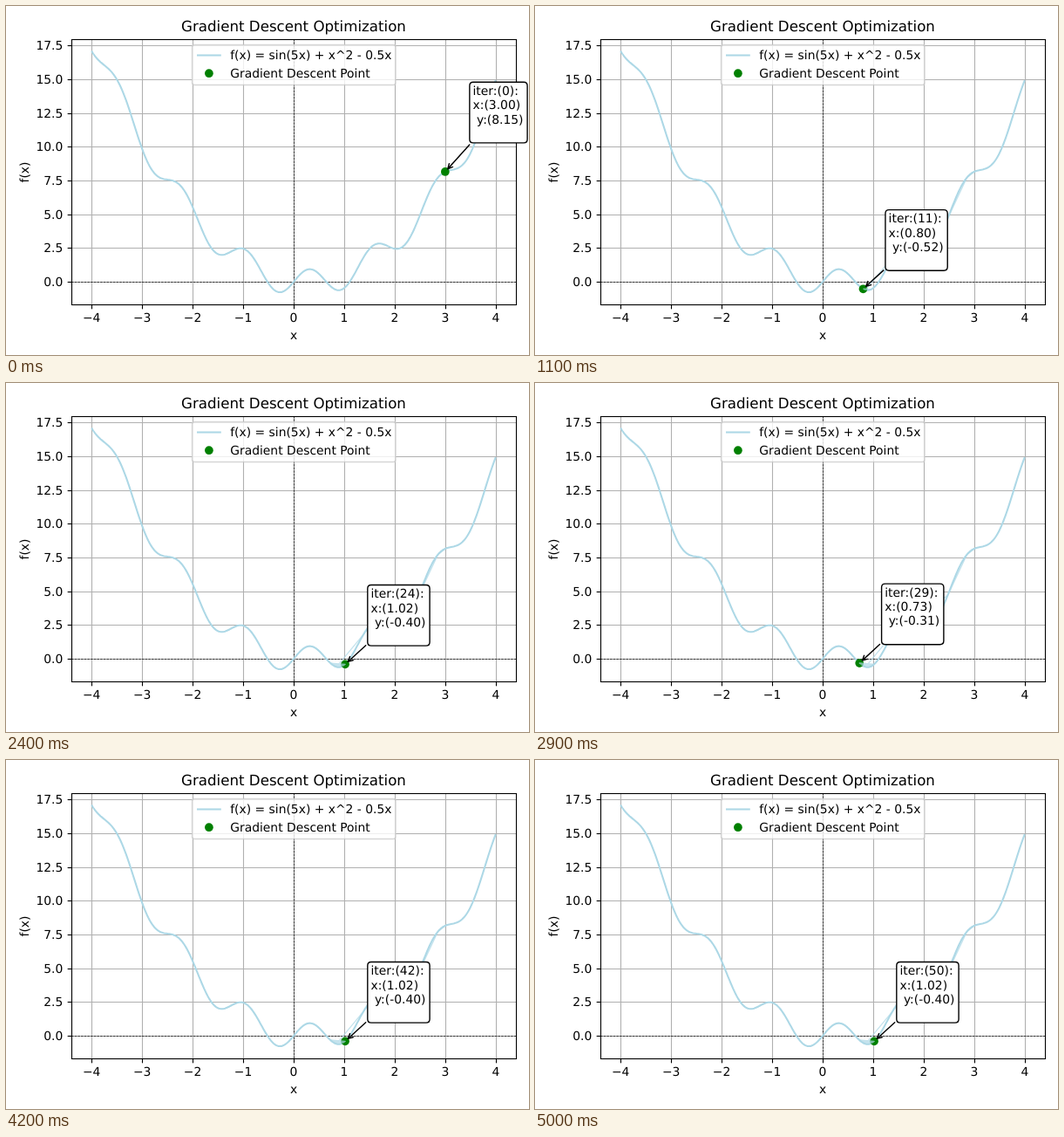
An HTML page for the animation above (5100 ms loop, 600 by 400 pixels).

```html
<!DOCTYPE html>
<html lang="en">
<head>
<meta charset="utf-8">
<title>Gradient Descent Optimization</title>
<style>
  html, body { margin: 0; width: 100%; height: 100%; overflow: hidden; background: #fff; }
  svg { display: block; width: 600px; height: 400px; }
  text { font: 13.89px "DejaVu Sans", sans-serif; white-space: pre; text-rendering: geometricPrecision; }
  .mid { text-anchor: middle; }
  .end { text-anchor: end; }
  .title { font-size: 16.67px; }
  .grid { stroke: #b0b0b0; stroke-width: 1.11; }
  .tick { stroke: #000; stroke-width: 1.11; }
  .zero { stroke: #000; stroke-width: .7; stroke-dasharray: 2.57 1.11; }
  .curve { fill: none; stroke: lightblue; stroke-width: 2.08; stroke-linejoin: round; }
  .trail { fill: none; stroke: lightblue; stroke-width: 1.39; stroke-linejoin: round; opacity: .7; }
  .dot { fill: green; }
  .arrow { fill: none; stroke: #000; stroke-width: 1.39; stroke-linecap: round; stroke-linejoin: round; }
  .box { fill: #fff; stroke: #000; stroke-width: 1.39; }
  .frame { fill: none; stroke: #000; stroke-width: 1.11; }
  .legend { fill: #fff; stroke: #ccc; stroke-width: 1.39; opacity: .8; }
</style>
</head>
<body>
<svg viewBox="0 0 600 400">
  <g id="axes"></g>
  <path id="curve" class="curve"/>
  <circle id="dot" class="dot" r="4.86"/>
  <path id="trail" class="trail"/>
  <rect class="frame" x="75.5" y="38.5" width="510" height="304"/>
  <text class="mid title" x="330" y="29">Gradient Descent Optimization</text>
  <text class="mid" x="330" y="382">x</text>
  <text class="mid" transform="translate(25.5 190.5) rotate(-90)">f(x)</text>
  <path id="arrow" class="arrow"/>
  <path id="box" class="box"/>
  <text id="line0"></text>
  <text id="line1"></text>
  <text id="line2"></text>
  <rect class="legend" x="213.5" y="44.5" width="233.5" height="46" rx="2.5"/>
  <path class="curve" d="M219 56.5H246.8"/>
  <circle class="dot" cx="232.9" cy="77.2" r="4.86"/>
  <text x="257.2" y="61">f(x) = sin(5x) + x^2 - 0.5x</text>
  <text x="257.2" y="82">Gradient Descent Point</text>
</svg>
<script>
const STEP = 100, COUNT = 51, RATE = 0.085;
const $ = id => document.getElementById(id);
const f = x => Math.sin(5 * x) + x * x - 0.5 * x;
const slope = x => 5 * Math.cos(5 * x) + 2 * x - 0.5;
const px = x => 330 + 57.95 * x;
const py = y => 316.2 - 15.49 * y;
const snap = v => Math.round(v) + 0.5;
const polyline = xs => 'M' + xs.map(x => `${px(x).toFixed(2)} ${py(f(x)).toFixed(2)}`).join('L');
const stroke = (cls, d) => `<path class="${cls}" d="${d}"/>`;

function drawAxes() {
  let out = '';
  for (let v = -4; v <= 4; v++) {
    const x = snap(px(v));
    out += stroke('grid', `M${x} 38V342`) + stroke('tick', `M${x} 342.5v4.86`) +
      `<text class="mid" x="${px(v)}" y="362">${String(v).replace('-', '\u2212')}</text>`;
  }
  for (let v = 0; v <= 17.5; v += 2.5) {
    const y = snap(py(v));
    out += stroke('grid', `M75 ${y}H585`) + stroke('tick', `M75.5 ${y}h-4.86`) +
      `<text class="end" x="65.3" y="${Math.round(py(v) + 5)}">${v.toFixed(1)}</text>`;
  }
  out += stroke('zero', 'M75 316.5H585') + stroke('zero', 'M330.5 342V38');
  $('axes').innerHTML = out;
  $('curve').setAttribute('d', polyline(Array.from({ length: 401 }, (_, i) => i / 50 - 4)));
}

const steps = [3];
while (steps.length < COUNT) {
  const x = steps[steps.length - 1];
  steps.push(x - RATE * slope(x));
}

function roundBox(x, y, w, h, r) {
  return `M${x + r} ${y}h${w - 2 * r}q${r} 0 ${r} ${r}v${h - 2 * r}q0 ${r} ${-r} ${r}` +
    `h${2 * r - w}q${-r} 0 ${-r} ${-r}v${2 * r - h}q0 ${-r} ${r} ${-r}z`;
}

// Open-headed arrow from the edge of a box towards a point
function arrowPath(cx, cy, w, h, tx, ty) {
  const dx = tx - cx, dy = ty - cy, len = Math.hypot(dx, dy);
  const ux = dx / len, uy = dy / len;
  const exit = Math.min(w / 2 / Math.abs(ux), h / 2 / Math.abs(uy));
  const at = (along, side) =>
    `${(cx + ux * along - uy * side).toFixed(2)} ${(cy + uy * along + ux * side).toFixed(2)}`;
  const tip = len - 2.78 - 1.55;
  return `M${at(exit + 2.78, 0)}L${at(tip, 0)}` +
    `M${at(tip - 5.56, 2.78)}L${at(tip, 0)}L${at(tip - 5.56, -2.78)}`;
}

function show(i) {
  const x = steps[i], y = f(x), dotX = px(x), dotY = py(y);
  $('dot').setAttribute('cx', dotX);
  $('dot').setAttribute('cy', dotY);
  $('trail').setAttribute('d', i ? polyline(steps.slice(0, i + 1)) : '');

  const left = dotX + 28.7 + 1.16 * x;
  const top = dotY - 91.4 - 1.38 * y;
  const w = (y < 0 ? 62.95 : 57.9) + 8.34, h = 69.6;
  $('box').setAttribute('d', roundBox(left - 4.17, top, w, h, 4.17));
  $('arrow').setAttribute('d', arrowPath(left - 4.17 + w / 2, top + h / 2, w, h, dotX, dotY));

  [`iter:(${i}): `, `x:(${x.toFixed(2)})`, ` y:(${y.toFixed(2)})`].forEach((label, n) => {
    const line = $('line' + n);
    line.textContent = label;
    line.setAttribute('x', left - 0.5);
    line.setAttribute('y', Math.round(top + 14.9 + 16.2 * n));
  });
}

let shown = -1;
function tick() {
  const i = Math.floor(performance.now() / STEP) % COUNT;
  if (i !== shown) show(shown = i);
  requestAnimationFrame(tick);
}

drawAxes();
tick();
</script>
</body>
</html>
```
